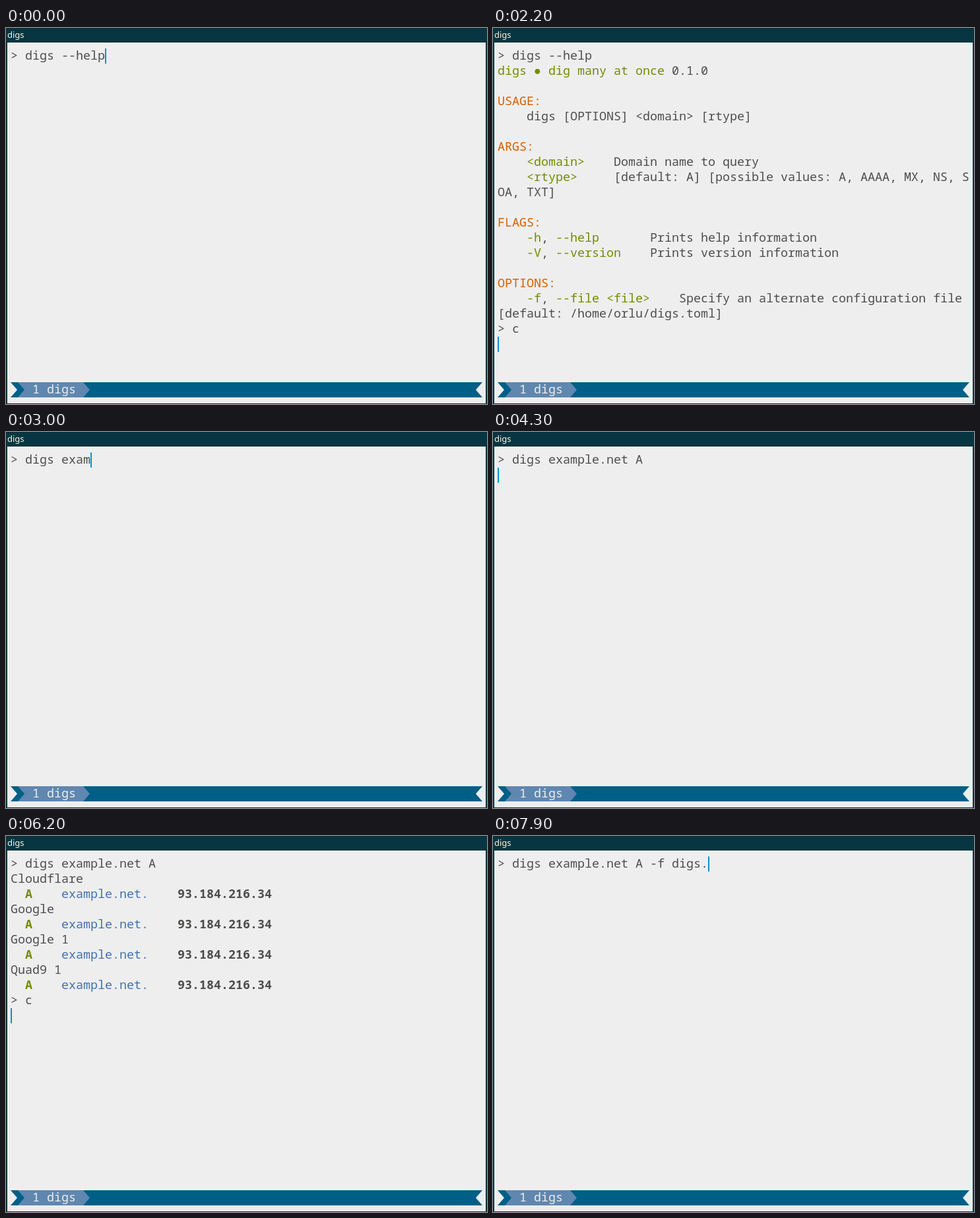
Write an HTML page that moves like this. It is 729x570 px and loops after 8 s.

```html
<!DOCTYPE html>
<html lang="en">
<head>
<meta charset="utf-8">
<title>digs</title>
<style>
  html, body { margin: 0; width: 729px; height: 570px; overflow: hidden; background: #eee; }
  svg { display: block; }
  text { white-space: pre; font: 18.3333px "Noto Sans Mono", "DejaVu Sans Mono", monospace; fill: #4d4d4c; }
  .title { font: 500 13px "Noto Sans", "Open Sans", sans-serif; fill: #fdf6e3; }
  .tab { fill: #eee; }
  .o { fill: #d75f00; }
  .g { fill: #718c00; }
  .b { fill: #4271ae; }
  .G { fill: #718c00; font-weight: 700; }
  .B { font-weight: 700; }
</style>
</head>
<body>
<svg width="729" height="570" viewBox="0 0 729 570">
  <rect width="729" height="570" fill="#073642"/>
  <rect x="2" y="22" width="725" height="547" fill="#eee"/>
  <path d="M0 .5H729M0 21.5H729" stroke="#002b36"/>
  <text class="title" x="2" y="15">digs</text>

  <rect x="7" y="537" width="715" height="23" fill="#005f87"/>
  <rect x="18" y="537" width="99" height="23" fill="#5f87af"/>
  <path d="M7 537L17 548.5L7 560ZM722 537L712 548.5L722 560Z" fill="#eee"/>
  <path d="M18 537L28 548.5L18 560Z" fill="#005f87"/>
  <path d="M117 537L127 548.5L117 560Z" fill="#5f87af"/>
  <text class="tab" x="40" y="554">1 digs</text>

  <g id="screen"></g>
  <rect id="cursor" width="2" height="23" fill="#0095c5"/>
</svg>
<script>
const LEFT = 7, TOP = 31, COL = 11, ROW = 23, BASELINE = 17, LOOP = 8000;
const SVG_NS = 'http://www.w3.org/2000/svg';
const screen = document.getElementById('screen');
const cursor = document.getElementById('cursor');

// Styled spans are written as {class text}.
const help = `> digs --help
{g digs} {g ●} {g dig many at once} 0.1.0

{o USAGE:}
    digs [OPTIONS] <domain> [rtype]

{o ARGS:}
    {g <domain>}    Domain name to query
    {g <rtype>}     [default: A] [possible values: A, AAAA, MX, NS, S
OA, TXT]

{o FLAGS:}
    {g -h}, {g --help}       Prints help information
    {g -V}, {g --version}    Prints version information

{o OPTIONS:}
    {g -f}, {g --file <file>}    Specify an alternate configuration file
[default: /home/orlu/digs.toml]`.split('\n');

const query = '> digs example.net A';
const fileQuery = query + ' -f digs.toml';
const answers = [query, ...['Cloudflare', 'Google', 'Google 1', 'Quad9 1'].flatMap(name =>
  [name, '  {G A}    {b example.net.}    {B 93.184.216.34}'])];

const typed = (command, length) => [command.slice(0, length)];

// Each step: start time and visible lines; the cursor follows the last line.
const steps = [
  [0, ['> digs --help']],
  [1000, ['> digs --help', '']],
  [1100, [...help, '> ']],
  [1300, [...help, '> c']],
  [2200, [...help, '> c', '']],
  [2300, typed(query, 2)],
  [2700, typed(query, 5)],
  [2900, typed(query, 8)],
  [3000, typed(query, 11)],
  [3200, typed(query, 14)],
  [3400, typed(query, 17)],
  [3500, typed(query, 20)],
  [4300, [query, '']],
  [4800, [...answers, '']],
  [4900, [...answers, '> ']],
  [5600, [...answers, '> c']],
  [6200, [...answers, '> c', '']],
  [6300, typed(fileQuery, 2)],
  [6600, typed(fileQuery, 5)],
  [6800, typed(fileQuery, 8)],
  [7000, typed(fileQuery, 11)],
  [7100, typed(fileQuery, 14)],
  [7300, typed(fileQuery, 17)],
  [7400, typed(fileQuery, 20)],
  [7500, typed(fileQuery, 23)],
  [7700, typed(fileQuery, 26)],
  [7900, typed(fileQuery, 29)],
];

function addText(text, style, col, row) {
  const indent = text.length - text.trimStart().length;
  const node = document.createElementNS(SVG_NS, 'text');
  node.setAttribute('class', style);
  node.setAttribute('x', LEFT + (col + indent) * COL);
  node.setAttribute('y', TOP + row * ROW + BASELINE);
  node.textContent = text.trim();
  screen.append(node);
}

function drawLine(line, row) {
  const parts = line.split(/\{(\w) (.*?)\}/);
  let col = 0;
  parts.forEach((part, i) => {
    if (i % 3 === 1) return;
    if (part.trim()) addText(part, i % 3 === 2 ? parts[i - 1] : '', col, row);
    col += part.length;
  });
}

function draw(lines) {
  screen.replaceChildren();
  lines.forEach(drawLine);
  cursor.setAttribute('x', LEFT + lines.at(-1).length * COL);
  cursor.setAttribute('y', TOP + (lines.length - 1) * ROW);
}

const start = performance.now();
let shown;
function update(now) {
  const time = Math.max(0, now - start) % LOOP;
  const step = steps.findLast(([at]) => at <= time);
  if (step !== shown) draw((shown = step)[1]);
  requestAnimationFrame(update);
}
update(start);
</script>
</body>
</html>
```
